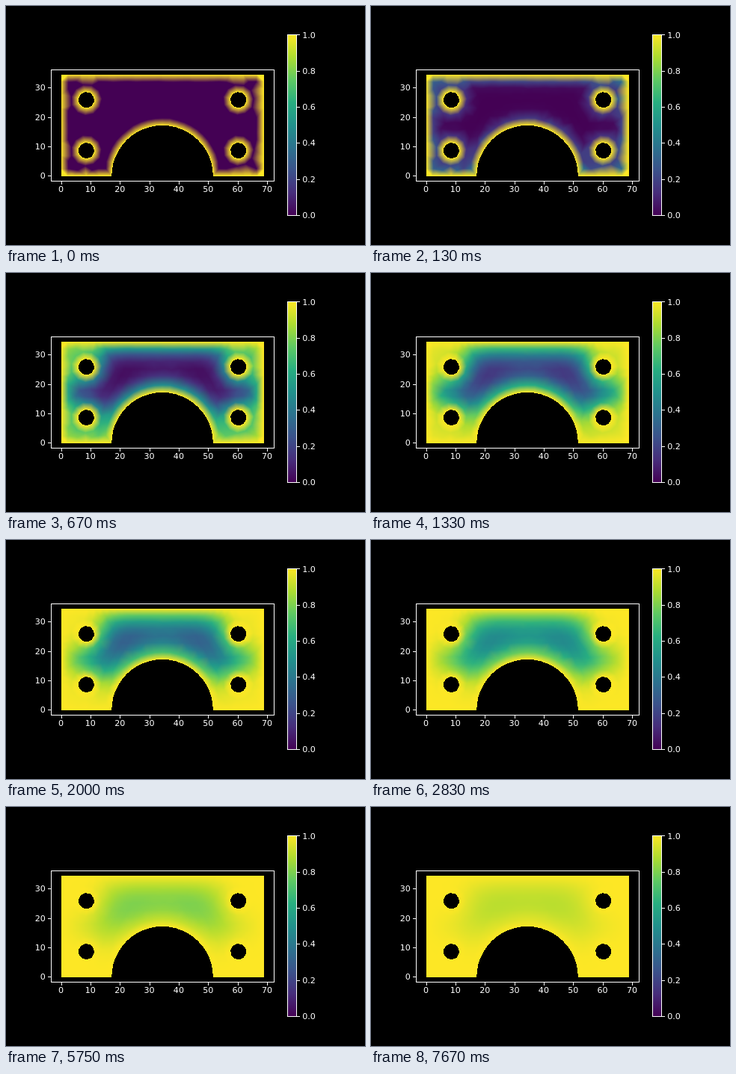
Recreate the animation shown at these times as an HTML page with a canvas. Size 480 by 320 pixels, loop 8 s.

```html
<!DOCTYPE html>
<html lang="en">
<head>
<meta charset="utf-8">
<title>Heat spreading through a plate</title>
<style>
  html, body { margin: 0; width: 480px; height: 320px; overflow: hidden; background: #000; }
  canvas, svg { position: absolute; left: 0; top: 0; }
  text { font: 11.11px "DejaVu Sans", sans-serif; fill: #fff; }
  .line { fill: none; stroke: #fff; stroke-width: 1; }
</style>
</head>
<body>
<canvas id="plate" width="480" height="320"></canvas>
<svg id="axes" width="480" height="320">
  <defs><linearGradient id="scale" x1="0" y1="1" x2="0" y2="0"></linearGradient></defs>
  <rect x="376" y="38" width="13" height="242.5" fill="url(#scale)"/>
  <rect class="line" x="376.5" y="38.5" width="12" height="242"/>
  <rect class="line" x="60.5" y="85.5" width="298" height="149"/>
</svg>
<script>
const LOOP = 8000, FPS = 24;
const X0 = 73.53, Y0 = 91.8, W = 271, H = 135.8;
const ARC = W / 4, HOLE = 10.7, UNIT = 3.935;
const holes = [[W / 8, H / 4], [W / 8, 3 * H / 4], [7 * W / 8, H / 4], [7 * W / 8, 3 * H / 4]];
const viridis = ['440154', '472d7b', '3b528b', '2c728e', '21918c', '28ae80', '5ec962', 'addc30', 'fde725'];
const stops = viridis.map(h => [0, 2, 4].map(i => parseInt(h.slice(i, i + 2), 16)));

function colorAt(v) {
  const s = Math.min(Math.max(v, 0), 1) * (stops.length - 1);
  const i = Math.min(Math.floor(s), stops.length - 2);
  return stops[i].map((c, k) => c + (stops[i + 1][k] - c) * (s - i));
}

// Axes and colour scale
function svg(tag, attrs, parent, text = '') {
  const el = document.createElementNS('http://www.w3.org/2000/svg', tag);
  for (const name in attrs) el.setAttribute(name, attrs[name]);
  el.textContent = text;
  parent.append(el);
}

function drawAxes() {
  const axes = document.getElementById('axes');
  const snap = v => Math.floor(v + 0.5) + 0.5;
  const tick = d => svg('path', { class: 'line', d }, axes);
  const label = (x, y, anchor, text) => svg('text', { x, y, 'text-anchor': anchor }, axes, text);
  viridis.forEach((c, i) =>
    svg('stop', { offset: i / (viridis.length - 1), 'stop-color': '#' + c }, document.getElementById('scale')));
  for (let v = 0; v <= 70; v += 10) {
    const x = X0 + v * UNIT;
    tick(`M${snap(x)} 235v4`);
    label(x, 249.4, 'middle', v);
  }
  for (let v = 0; v <= 30; v += 10) {
    const y = 227.2 - v * UNIT;
    tick(`M60 ${snap(y)}h-4`);
    label(52.8, y + 4, 'end', v);
  }
  for (let i = 0; i <= 5; i++) {
    const y = 280 - i * 48.32;
    tick(`M389 ${snap(y)}h4`);
    label(396.2, y + 4.1, 'start', (i / 5).toFixed(1));
  }
}

// Mesh
let seed = 7;
function random() {
  seed = (seed * 16807) % 2147483647;
  return seed / 2147483647;
}
const jitter = size => (random() - 0.5) * size;

function edgeDistance(x, y) {
  return Math.min(x, W - x, y, H - y, Math.hypot(x - W / 2, y - H) - ARC,
    ...holes.map(([hx, hy]) => Math.hypot(x - hx, y - hy) - HOLE));
}

function line(x1, y1, x2, y2, n, add) {
  for (let i = 0; i < n; i++) add(x1 + (x2 - x1) * i / n, y1 + (y2 - y1) * i / n);
}

function arc(cx, cy, r, from, to, n, add) {
  for (let i = 0; i < n; i++) {
    const a = from + (to - from) * i / n;
    add(cx + r * Math.cos(a), cy + r * Math.sin(a));
  }
}

function makePoints() {
  const points = [];
  const edge = (x, y) => points.push([x + jitter(0.04), y + jitter(0.04)]);
  line(0, 0, W, 0, 30, edge);
  line(W, 0, W, H, 15, edge);
  line(W, H, W / 2 + ARC, H, 8, edge);
  arc(W / 2, H, ARC, 0, -Math.PI, 24, edge);
  line(W / 2 - ARC, H, 0, H, 8, edge);
  line(0, H, 0, 0, 15, edge);
  for (const [x, y] of holes) arc(x, y, HOLE, 0.2, 0.2 + 2 * Math.PI, 10, edge);

  const fixed = points.length;
  const inner = (x, y) => {
    x += jitter(0.8);
    y += jitter(0.8);
    if (edgeDistance(x, y) < 7.5) return;
    if (points.slice(fixed).some(p => Math.hypot(p[0] - x, p[1] - y) < 7.5)) return;
    points.push([x, y]);
  };
  for (const [x, y] of holes) arc(x, y, HOLE + 10, 0.5, 0.5 + 2 * Math.PI, 11, inner);
  const g = 10;
  line(g, g, W - g, g, 25, inner);
  line(W - g, g, W - g, H - g, 12, inner);
  line(W - g, H - g, g, H - g, 25, inner);
  line(g, H - g, g, g, 12, inner);
  arc(W / 2, H, ARC + g, 0, -Math.PI, 24, inner);
  for (let row = 0; row * 9.2 < H; row++)
    for (let x = (row % 2) * 5.3; x < W; x += 10.6) inner(x + jitter(2), row * 9.2 + jitter(2));
  return { points, fixed };
}

// Delaunay triangulation, adding one point at a time
function triangulate(points) {
  const n = points.length;
  const all = [...points, [-2000, -1000], [3000, -1000], [135, 4000]];
  const makeTri = (a, b, c) => {
    const [ax, ay] = all[a];
    const bx = all[b][0] - ax, by = all[b][1] - ay, cx = all[c][0] - ax, cy = all[c][1] - ay;
    const d = 2 * (bx * cy - by * cx), bb = bx * bx + by * by, cc = cx * cx + cy * cy;
    const ux = (cy * bb - by * cc) / d, uy = (bx * cc - cx * bb) / d;
    return { v: [a, b, c], x: ax + ux, y: ay + uy, rr: ux * ux + uy * uy };
  };
  let tris = [makeTri(n, n + 1, n + 2)];
  points.forEach(([x, y], p) => {
    const rim = new Map(), kept = [];
    for (const t of tris) {
      if ((t.x - x) ** 2 + (t.y - y) ** 2 >= t.rr) {
        kept.push(t);
        continue;
      }
      t.v.forEach((a, i) => {
        const b = t.v[(i + 1) % 3], key = Math.min(a, b) + '_' + Math.max(a, b);
        if (!rim.delete(key)) rim.set(key, [a, b]);
      });
    }
    for (const [a, b] of rim.values()) kept.push(makeTri(a, b, p));
    tris = kept;
  });
  return tris.map(t => t.v).filter(v => {
    if (v.some(i => i >= n)) return false;
    const mid = k => v.reduce((sum, i) => sum + points[i][k], 0) / 3;
    return edgeDistance(mid(0), mid(1)) > 0.1;
  });
}

// Heat equation with linear elements; the edges are held at 1.
// The coldest node sets the pace: it reaches COLD at COLD_TIME seconds.
const COLD = 0.635, COLD_TIME = 3.96, STEP = 0.5;
function simulate({ points, fixed }, tris) {
  const n = points.length, mass = new Float64Array(n), links = [];
  for (const v of tris) {
    v.forEach((c, i) => {
      const a = v[(i + 1) % 3], b = v[(i + 2) % 3];
      const ax = points[a][0] - points[c][0], ay = points[a][1] - points[c][1];
      const bx = points[b][0] - points[c][0], by = points[b][1] - points[c][1];
      const cross = Math.abs(ax * by - ay * bx);
      mass[c] += cross / 6;
      if (a >= fixed || b >= fixed) links.push([a, b, (ax * bx + ay * by) / cross / 2]);
    });
  }
  const u = new Float64Array(n).fill(1, 0, fixed), flow = new Float64Array(n);
  const history = [Float32Array.from(u)];
  let pace = 0;
  for (let s = 1; s < 8000 && (!pace || s <= pace * LOOP / 1000); s++) {
    flow.fill(0);
    for (const [a, b, w] of links) {
      const f = w * (u[b] - u[a]);
      flow[a] += f;
      flow[b] -= f;
    }
    let coldest = 1;
    for (let i = fixed; i < n; i++) {
      u[i] += STEP * flow[i] / mass[i];
      coldest = Math.min(coldest, u[i]);
    }
    history.push(Float32Array.from(u));
    if (!pace && coldest >= COLD) pace = s / COLD_TIME;
  }
  return { history, pace: pace || 300 };
}

// Pixels with their triangle corners and weights
function rasterize(points, tris) {
  const pixels = [];
  for (const [a, b, c] of tris) {
    const [p, q, r] = [a, b, c].map(i => [points[i][0] + X0, points[i][1] + Y0]);
    const range = k => [Math.floor(Math.min(p[k], q[k], r[k])), Math.ceil(Math.max(p[k], q[k], r[k]))];
    const [x1, x2] = range(0), [y1, y2] = range(1);
    const d = (q[1] - r[1]) * (p[0] - r[0]) + (r[0] - q[0]) * (p[1] - r[1]);
    for (let y = y1; y < y2; y++) {
      for (let x = x1; x < x2; x++) {
        const dx = x + 0.5 - r[0], dy = y + 0.5 - r[1];
        const wa = ((q[1] - r[1]) * dx + (r[0] - q[0]) * dy) / d;
        const wb = ((r[1] - p[1]) * dx + (p[0] - r[0]) * dy) / d;
        if (Math.min(wa, wb, 1 - wa - wb) > -1e-6) pixels.push({ at: (y * 480 + x) * 4, a, b, c, wa, wb });
      }
    }
  }
  return pixels;
}

drawAxes();
const mesh = makePoints();
const tris = triangulate(mesh.points);
const { history, pace } = simulate(mesh, tris);
const pixels = rasterize(mesh.points, tris);
const ctx = document.getElementById('plate').getContext('2d');
const image = ctx.createImageData(480, 320);

function drawPlate(seconds) {
  const heat = history[Math.min(Math.round(seconds * pace), history.length - 1)];
  const colors = Array.from(heat, colorAt);
  for (const { at, a, b, c, wa, wb } of pixels) {
    const ca = colors[a], cb = colors[b], cc = colors[c], wc = 1 - wa - wb;
    for (let k = 0; k < 3; k++) image.data[at + k] = ca[k] * wa + cb[k] * wb + cc[k] * wc;
    image.data[at + 3] = 255;
  }
  ctx.putImageData(image, 0, 0);
}

const start = performance.now();
let shown = -1;
function tick() {
  const t = (performance.now() - start) % LOOP;
  const frame = Math.floor((t + 4) * FPS / 1000) % (LOOP * FPS / 1000);
  if (frame !== shown) drawPlate(frame / FPS);
  shown = frame;
  requestAnimationFrame(tick);
}
tick();
</script>
</body>
</html>
```
